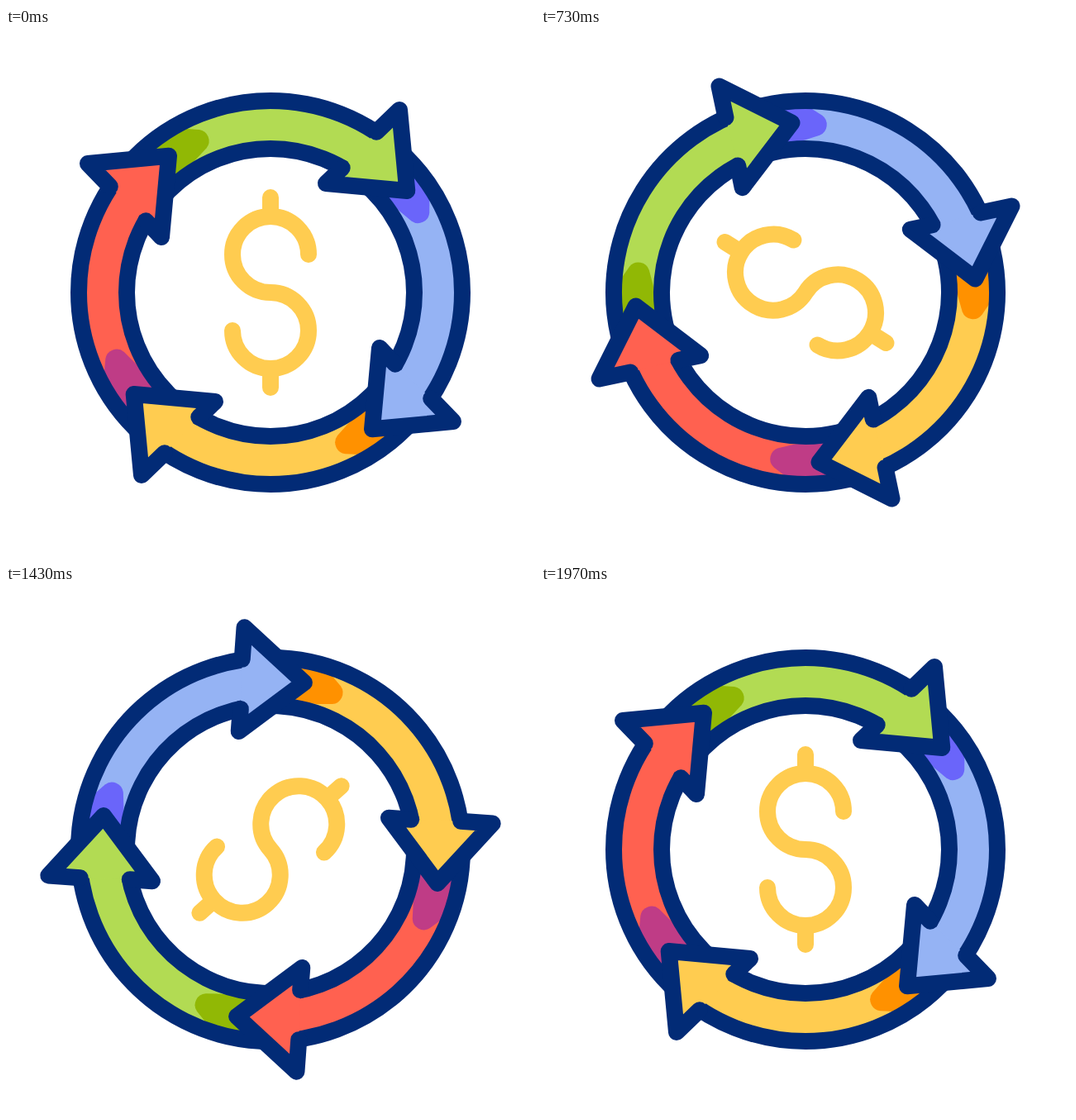
Write an HTML page that moves like this. It is 640 by 640 pixels and loops after 2 s.

```html
<!DOCTYPE html>
<html lang="en">
<head>
<meta charset="utf-8">
<title>Money cycle</title>
<style>
  html, body { margin: 0; width: 100%; height: 100%; overflow: hidden; background: #fff; }
  svg { display: block; width: 100vw; height: 100vh; }
  .line { fill: none; stroke-width: 20; stroke-linecap: round; stroke-linejoin: round; }
</style>
</head>
<body>
<svg viewBox="0 0 640 640">
  <g id="wheel">
    <g id="bodies"></g>
    <g class="line" stroke="#022b76">
      <circle cx="320" cy="320" r="174"/>
      <circle cx="320" cy="320" r="232"/>
    </g>
    <g id="heads"></g>
    <path class="line" stroke="#ffcc50"
      d="M366 274A46 46 0 1 0 320 320A46 46 0 1 1 274 366M320 205V228M320 412V435"/>
  </g>
</svg>
<script>
const NAVY = '#022b76';
const CENTER = 320, RADIUS = 203;
const FRAMES = 60, LOOP = 2000;

// One arrow per quarter turn; shadeEnd is the angle where its tail shade ends.
const arrows = [
  { color: '#b2db53', shade: '#91b805', shadeEnd: -111.8 },
  { color: '#95b3f4', shade: '#6a65fa', shadeEnd: -114.8 },
  { color: '#ffcc50', shade: '#ff9100', shadeEnd: -113 },
  { color: '#ff6150', shade: '#bf3c86', shadeEnd: -110 }
];

const HEAD = 'M448.2 125.8L476 99L485.3 197L387 188L406.7 169.2';
// Drawn around the ring's middle line, pointing along +y.
const SHADE = 'M-38 -75L-20 -24L-12 -7Q-8 0 0 0Q8 0 12 -7L20 -24L24 -75Z';

const wheel = document.getElementById('wheel');
const bodies = document.getElementById('bodies');
const heads = document.getElementById('heads');

function add(parent, d, attributes) {
  const path = document.createElementNS('http://www.w3.org/2000/svg', 'path');
  path.setAttribute('d', d);
  for (const name in attributes) path.setAttribute(name, attributes[name]);
  parent.append(path);
}

function spin(degrees) {
  return `rotate(${degrees} ${CENTER} ${CENTER})`;
}

const reach = RADIUS * Math.SQRT1_2;
const BODY = `M${CENTER - reach} ${CENTER - reach}A${RADIUS} ${RADIUS} 0 0 1 ${CENTER + reach} ${CENTER - reach}`;

arrows.forEach(({ color, shade, shadeEnd }, i) => {
  const turn = spin(i * 90);
  add(bodies, BODY, { transform: turn, fill: 'none', stroke: color, 'stroke-width': 42 });
  add(bodies, SHADE, {
    transform: `${spin(i * 90 + shadeEnd)} translate(${CENTER + RADIUS} ${CENTER})`,
    fill: shade
  });
  add(heads, HEAD, { transform: turn, class: 'line', style: `fill:${color}`, stroke: NAVY });
});

function ease(value, start, end) {
  const u = Math.min(1, Math.max(0, (value - start) / (end - start)));
  return u * u * (3 - 2 * u);
}

// Winds back a little under a quarter turn, then sweeps forward to a full turn.
function angleAt(frame) {
  const windUp = -85.4;
  return windUp * ease(frame, 0, 15.5) + (360 - windUp) * ease(frame, 15.5, 58.5);
}

function render(time) {
  const frame = Math.floor((time % LOOP + 4) * FRAMES / LOOP) % FRAMES;
  wheel.setAttribute('transform', spin(angleAt(frame)));
}

let origin;
function tick(now) {
  origin ??= now;
  render(now - origin);
  requestAnimationFrame(tick);
}
render(0);
requestAnimationFrame(tick);
</script>
</body>
</html>
```
